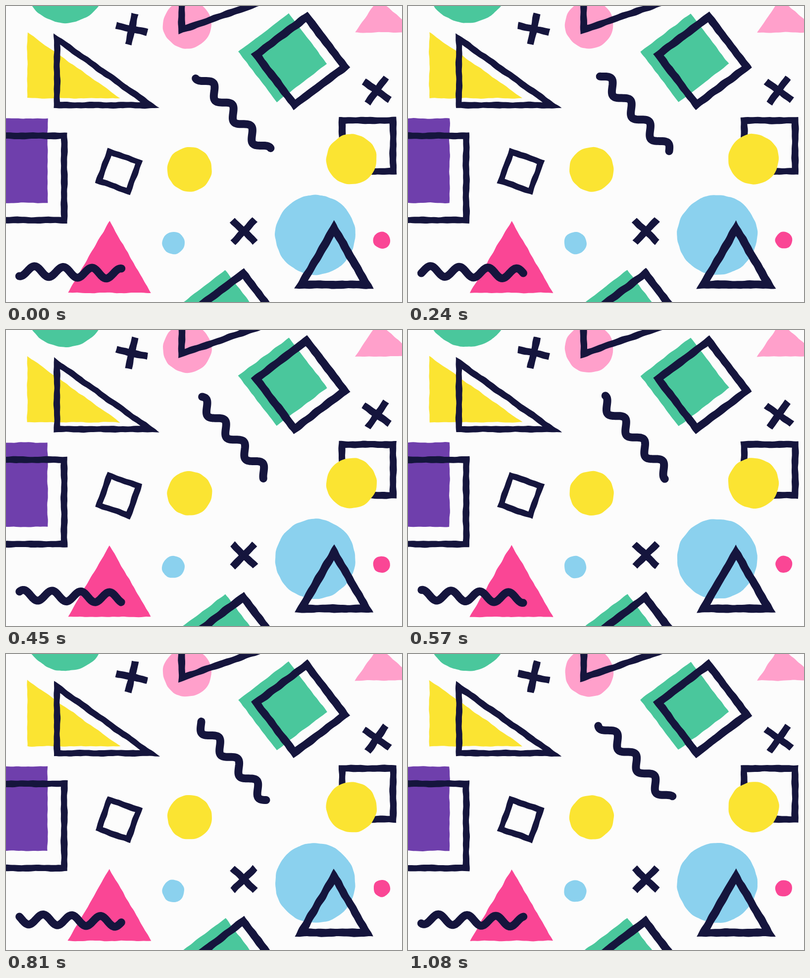
Write an HTML page with a canvas that moves like this. It is 800 px wide and 600 px high and loops after 1110 ms.

```html
<!DOCTYPE html>
<html lang="en">
<head>
<meta charset="utf-8">
<title>Wobbly shapes</title>
<style>
  html, body { margin: 0; width: 100%; height: 100%; overflow: hidden; background: #fcfcfc; }
  canvas { display: block; }
</style>
</head>
<body>
<canvas id="stage" width="800" height="600"></canvas>
<script>
const ctx = document.getElementById('stage').getContext('2d');
const STEP = 30, STEPS = 37, WAVE_STEPS = 38.5;
const NAVY = '#15153d', YELLOW = '#fbe432', GREEN = '#4ac79c', PINK = '#fa4695',
      ROSE = '#ffa0cb', PURPLE = '#6f3fac', BLUE = '#8bd1ee';
let step = 0;

// Hand-drawn jitter: a smooth displacement field, new in every step.
function ripple(x, y, seed) {
  const k = 2.4 * step + seed;
  return 0.4 * Math.sin(0.06 * x + 0.09 * y + k)
       + 0.35 * Math.sin(0.17 * x - 0.11 * y + 1.7 * k)
       + 0.25 * Math.sin(0.13 * x + 0.29 * y + 3.1 * k);
}
const wobble = (x, y) => [x + ripple(x, y, 0), y + ripple(y, x, 2)];

function trace(points) {
  points.forEach(([x, y], i) => {
    const [nx, ny] = points[(i + 1) % points.length];
    const parts = Math.ceil(Math.hypot(nx - x, ny - y) / 5);
    for (let j = 0; j < parts; j++) {
      const p = wobble(x + (nx - x) * j / parts, y + (ny - y) * j / parts);
      i || j ? ctx.lineTo(...p) : ctx.moveTo(...p);
    }
  });
  ctx.closePath();
}

function fill(color, ...loops) {
  ctx.fillStyle = color;
  ctx.beginPath();
  loops.forEach(trace);
  ctx.fill('evenodd');
}

// Moves every side of a convex polygon inwards by d.
function inset(points, d) {
  const n = points.length;
  return points.map(([x, y], i) => {
    const [a, b] = [points[(i + n - 1) % n], points[(i + 1) % n]].map(([px, py]) => {
      const len = Math.hypot(px - x, py - y);
      return [(px - x) / len, (py - y) / len];
    });
    const m = d / Math.abs(a[0] * b[1] - a[1] * b[0]);
    return [x + (a[0] + b[0]) * m, y + (a[1] + b[1]) * m];
  });
}

const outline = (width, points) =>
  fill(NAVY, inset(points, -width / 2), inset(points, width / 2));

// Maps local coordinates to a rotated frame at x, y.
function frame(x, y, degrees) {
  const a = degrees * Math.PI / 180, c = Math.cos(a), s = Math.sin(a);
  return ([u, v]) => [x + u * c - v * s, y + u * s + v * c];
}

const bar = (x, y, w, h, degrees = 0) =>
  [[-w, -h], [w, -h], [w, h], [-w, h]].map(([u, v]) => [u / 2, v / 2]).map(frame(x, y, degrees));

const square = (x, y, size, degrees) => bar(x, y, size, size, degrees);

const equilateral = (x, top, size) => {
  const base = top + size * Math.sqrt(3) / 2;
  return [[x, top], [x + size / 2, base], [x - size / 2, base]];
};

const rightTriangle = (x, y) => [[x, y], [x + 188, y + 134], [x, y + 134]];

function circle(color, x, y, r) {
  const n = 72;
  fill(color, Array.from({ length: n }, (_, i) => {
    const a = i / n * 2 * Math.PI;
    return [x + r * Math.cos(a), y + r * Math.sin(a)];
  }));
}

function cross(x, y, degrees) {
  for (const turn of [0, 90]) fill(NAVY, bar(x, y, 64.5, 14, degrees + turn));
}

// A sine wave that travels towards its own start.
function squiggle(x, y, degrees) {
  const place = frame(x, y, degrees);
  ctx.beginPath();
  for (let u = 0; u <= 206; u += 2) {
    const phase = (u - 30.5) / 58 + step / WAVE_STEPS;
    ctx.lineTo(...place([u, -10.5 * Math.cos(2 * Math.PI * phase)]));
  }
  ctx.strokeStyle = NAVY;
  ctx.lineWidth = 16;
  ctx.lineCap = ctx.lineJoin = 'round';
  ctx.stroke();
}

function tiltedSquares(x, y) {
  fill(GREEN, square(x, y, 128, -37.2));
  outline(15.5, square(x + 36, y + 6, 127.5, -37.2));
}

function draw() {
  ctx.fillStyle = '#fcfcfc';
  ctx.fillRect(0, 0, 800, 600);

  circle(GREEN, 120, -49, 83.5);
  cross(254, 46.5, 12.5);
  circle(ROSE, 366, 37.5, 49);
  outline(13.5, [[355, -100], [355, 48], [700, -72]]);
  tiltedSquares(559, 105);
  fill(ROSE, [[705, 54], [752, -15], [830, 53]]);
  cross(749, 171.5, 35.5);

  fill(YELLOW, rightTriangle(43, 53));
  outline(12.5, rightTriangle(103, 67));
  squiggle(391, 140, 48.8);

  fill(PURPLE, square(-1.5, 313.5, 171));
  outline(13, square(32, 348.5, 171));
  outline(12, square(228, 335.5, 63, 19.5));
  circle(YELLOW, 371, 331, 45);
  outline(13.5, square(730.5, 283.5, 103));
  circle(YELLOW, 698, 310.5, 51);

  fill(PINK, equilateral(209, 436, 168));
  squiggle(27, 537.2, 1.5);
  circle(BLUE, 338, 480.5, 22.5);
  cross(480.5, 456.5, 44);
  circle(BLUE, 624.7, 464, 81);
  outline(16, equilateral(662.7, 450.5, 132));
  circle(PINK, 759, 475, 17);
  tiltedSquares(431, 625);
}

function tick() {
  step = Math.floor(performance.now() / STEP) % STEPS;
  draw();
  requestAnimationFrame(tick);
}
tick();
</script>
</body>
</html>
```
